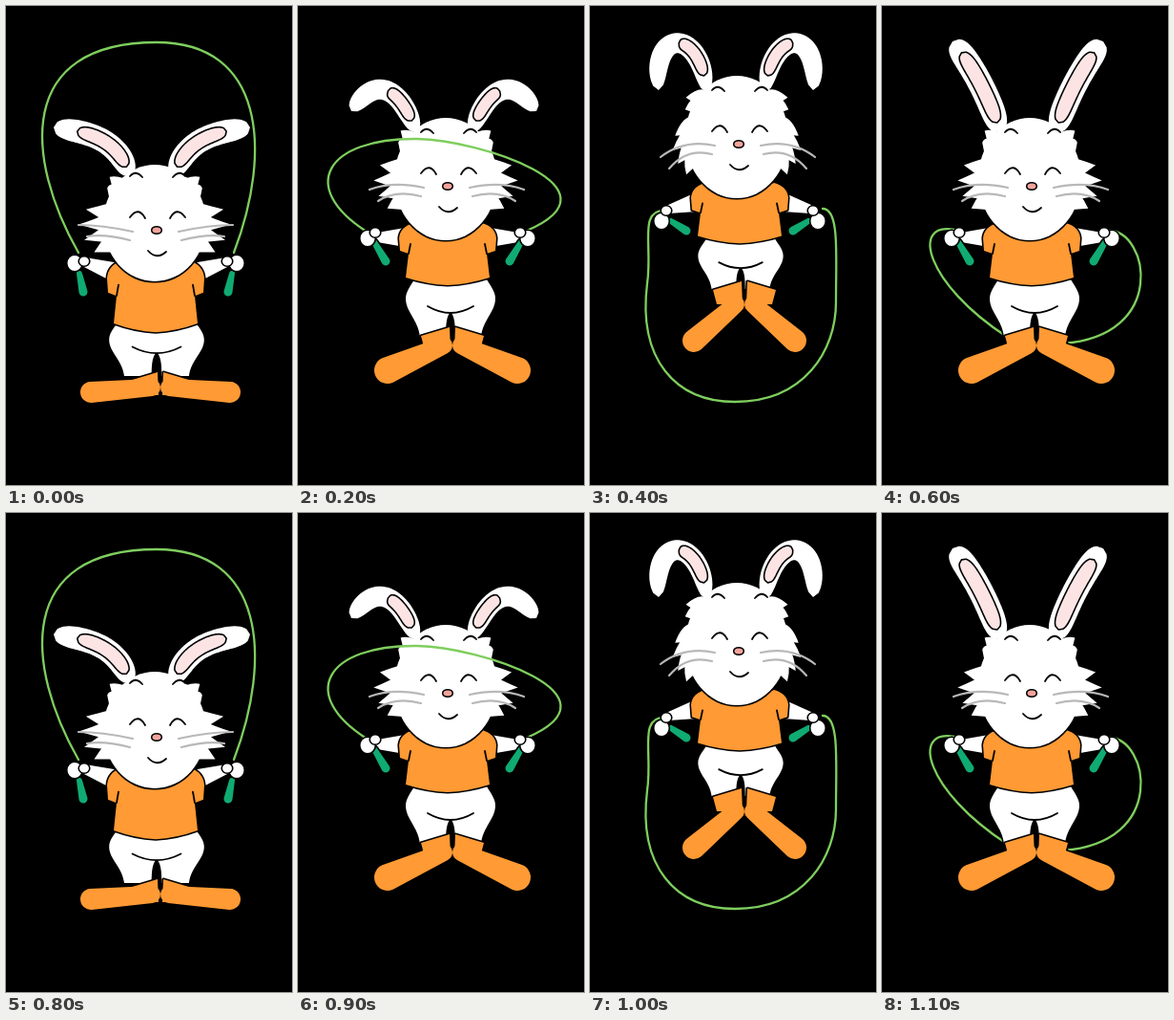
Recreate the animation shown at these times as an HTML page with a canvas. Size 300 by 501 pixels, loop 1.2 s.

```html
<!DOCTYPE html>
<html lang="en">
<head>
<meta charset="utf-8">
<title>Skipping rabbit</title>
<style>
html, body { margin: 0; width: 100%; height: 100%; overflow: hidden; background: #000; }
canvas { display: block; width: 100vw; height: 100vh; }
</style>
</head>
<body>
<canvas id="stage" width="300" height="501"></canvas>
<script>
const ctx = document.getElementById('stage').getContext('2d');

const WHITE = '#fff', BLACK = '#000', ORANGE = '#ff9a34', PINK = '#fde4e4';
const GREEN = '#10ab72', ROPE = '#7fce5e', GREY = '#b8b8b8', NOSE = '#f3a49b';
const BODY_X = 157, EAR_X = 153, BOOT_X = 162;

function ink(path, color = BLACK, width = 1.8) {
  ctx.strokeStyle = color;
  ctx.lineWidth = width;
  ctx.stroke(path);
}

// Several paths become one silhouette with a dark rim.
function paint(color, ...paths) {
  paths.forEach(p => ink(p, BLACK, 3.2));
  ctx.fillStyle = color;
  paths.forEach(p => ctx.fill(p));
}

// Places a half drawing on both sides of the vertical line at x.
function pair(half, x, y = 0, sx = 1, sy = 1) {
  const path = new Path2D();
  for (const side of [-1, 1]) {
    path.addPath(half, new DOMMatrix([side * sx, 0, 0, sy, x, y]));
  }
  return path;
}

function oval(x, y, rx, ry) {
  const path = new Path2D();
  path.ellipse(x, y, rx, ry, 0, 0, Math.PI * 2);
  return path;
}

// Rounded bar whose radius goes from r1 to r2.
function taper([x1, y1], r1, [x2, y2], r2) {
  const path = new Path2D(), a = Math.atan2(y2 - y1, x2 - x1), q = Math.PI / 2;
  path.arc(x1, y1, r1, a + q, a + 3 * q);
  path.arc(x2, y2, r2, a - q, a + q);
  path.closePath();
  return path;
}

// Band along part of a cubic spine, rounded at both ends.
function band(spine, from, to, width) {
  const left = [], right = [], steps = 40;
  for (let i = 0; i <= steps; i++) {
    const u = i / steps, t = from + (to - from) * u, s = 1 - t;
    const [x, y, dx, dy] = [0, 1].map(k => {
      const [a, b, c, d] = spine.map(p => p[k]);
      return s * s * s * a + 3 * s * s * t * b + 3 * s * t * t * c + t * t * t * d;
    }).concat([0, 1].map(k => {
      const [a, b, c, d] = spine.map(p => p[k]);
      return s * s * (b - a) + 2 * s * t * (c - b) + t * t * (d - c);
    }));
    const h = width * Math.sqrt(1 - (2 * u - 1) ** 6) / Math.hypot(dx, dy);
    left.push([x - dy * h, y + dx * h]);
    right.unshift([x + dy * h, y - dx * h]);
  }
  const path = new Path2D();
  left.concat(right).forEach(p => path.lineTo(...p));
  path.closePath();
  return path;
}

// One pointed lock of fur on the right half of a head with radii rx, ry.
function lock(rx, ry, deg, reach, tilt) {
  const at = (d, k = 1) => {
    const a = d * Math.PI / 180;
    return [rx * k * Math.cos(a), ry * k * Math.sin(a)];
  };
  const path = new Path2D();
  path.moveTo(...at(deg - 10, 0.97));
  path.quadraticCurveTo(...at(deg - 5, 1.12), ...at(deg + tilt, 1 + reach));
  path.lineTo(...at(deg + 8, 0.97));
  path.closePath();
  return path;
}

function fur({ x, y, ry, fluff, tilt }) {
  const locks = [lock(54, ry, -42, 0.18, tilt), lock(54, ry, -33, 0.1, tilt)];
  for (let deg = -10; deg <= 24; deg += 11) {
    locks.push(lock(54, ry, deg, fluff * (1 - Math.abs(deg - 3) / 45), tilt));
  }
  return [oval(x, y, 54, ry), ...locks.map(l => pair(l, x, y))];
}

const HALF_SHIRT = new Path2D('M0 10L36 -4Q50 0 51 12L50 25L41 28L44 53Q22 60 0 61Z');
const SLEEVE = new Path2D('M41 28L39 18');
const HALF_HIPS = new Path2D('M0 0H37C41 8 47 14 47 22C47 36 34 44 32 62H5C5 48 4 40 0 36Z');
const CROTCH = new Path2D('M0 37Q12 37 24 30');
const ANKLE = new Path2D('M3 0L33 9L29 24H2Z');

function face(dx, dy) {
  ctx.save();
  ctx.translate(dx, dy);
  ink(pair(new Path2D('M13 176Q20 163 29 175M16 133Q23 125 29 132'), 158));
  ink(new Path2D('M148 210Q157 220 167 211'));
  paint(NOSE, oval(157, 188.5, 4.5, 3));
  ctx.restore();
}

function whiskers(x, y, droop) {
  const half = new Path2D();
  [[24, 81], [27, 72]].forEach(([near, far], i) => {
    const top = y + 9 * i;
    half.moveTo(near, top);
    half.quadraticCurveTo((near + far) / 2 + 4, top - 7, far, top + droop + 3 * i);
  });
  ink(pair(half, x), GREY, 2.2);
}

// Sides are measured outwards from the middle of each part.
const mid = {
  head: { x: 155, y: 181, ry: 64, fluff: 0.42, tilt: 0, droop: 2 },
  shirt: [231, 1], hips: [160, 284, 1, 1],
  boot: 336, heel: [9, 19], toe: [68, 45], toeSize: 14,
  arm: [[45, 242], [74, 242]], fist: [84, 243], thumb: [76, 237],
  grip: [[77, 247], [65, 267]]
};

const low = {
  head: { x: 156, y: 227, ry: 61, fluff: 0.5, tilt: 0, droop: -7 },
  ear: [[23, 178], [35, 140], [63, 132], [103, 127]], earSize: 12, pinkEnd: 0.77,
  shirt: [271, 1.15], hips: [158, 328, 1.06, 0.95],
  boot: 383, heel: [9, 16], toe: [73, 21], toeSize: 11,
  arm: [[44, 278], [74, 268]], fist: [85, 269], thumb: [75, 267],
  grip: [[80, 280], [76, 299]],
  rope: 'M76 258C20 160 10 38 158 38C270 38 280 150 239 258'
};

const rise = {
  ...mid,
  ear: [[29, 132], [45, 86], [71, 70], [97, 110]], earSize: 10.5, pinkEnd: 0.48,
  rope: 'M72 236C0 190 28 138 125 139C190 140 345 190 240 235'
};

const high = {
  head: { x: 154, y: 137, ry: 64, fluff: 0.28, tilt: 9, droop: 12 },
  ear: [[31, 90], [35, 24], [89, 20], [81, 88]], earSize: 10.5, pinkEnd: 0.48,
  shirt: [189, 0.97], hips: [158, 242, 0.95, 0.87],
  boot: 288, heel: [9, 24], toe: [53, 62], toeSize: 12,
  arm: [[44, 205], [72, 212]], fist: [82, 225], thumb: [77, 214],
  grip: [[72, 225], [56, 235]],
  rope: 'M80 214C50 212 66 250 60 290C50 370 90 414 152 414C225 414 258 360 258 310S262 212 244 212'
};

const fall = {
  ...mid,
  ear: [[29, 132], [40, 96], [58, 62], [79, 37]], earSize: 13, pinkEnd: 0.84,
  rope: 'M76 234C30 225 45 290 131 346M238 235C280 235 300 345 190 353'
};

const poses = [low, rise, high, fall];

function draw(p) {
  const { x, y, droop } = p.head;
  const [hipX, ...hipFit] = p.hips;
  const [shirtY, stretch] = p.shirt;
  const rope = () => ink(new Path2D(p.rope), ROPE, 2.3);
  const sides = half => pair(half, BODY_X);

  ctx.fillStyle = BLACK;
  ctx.fillRect(0, 0, 300, 501);
  ctx.lineCap = ctx.lineJoin = 'round';

  if (p === fall) rope();
  paint(WHITE, sides(taper(p.arm[0], 10, p.arm[1], 5)));
  paint(WHITE, pair(HALF_HIPS, hipX, ...hipFit));
  ink(pair(CROTCH, hipX, ...hipFit));
  const foot = taper(p.heel, 9, p.toe, p.toeSize);
  paint(ORANGE, pair(ANKLE, BOOT_X, p.boot), pair(foot, BOOT_X, p.boot));
  paint(ORANGE, pair(HALF_SHIRT, BODY_X, shirtY, 1, stretch));
  ink(pair(SLEEVE, BODY_X, shirtY, 1, stretch));

  paint(WHITE, ...fur(p.head), pair(band(p.ear, 0, 1, p.earSize), EAR_X));
  paint(PINK, pair(band(p.ear, 0.1, p.pinkEnd, p.earSize * 0.55), EAR_X));
  whiskers(x + 1, y + 9, droop);
  face(x - 155, y - 181);

  if (p !== fall) rope();
  paint(GREEN, sides(taper(p.grip[0], 3, p.grip[1], 4.5)));
  paint(WHITE, sides(oval(...p.fist, 7.5, 8)));
  paint(WHITE, sides(oval(...p.thumb, 5, 4.5)));
}

// One slow skip followed by one at double speed.
function poseAt(ms) {
  const t = ms % 1200;
  return t < 800 ? Math.floor(t / 200) : Math.floor((t - 800) / 100);
}

const start = performance.now();
let shown = -1;
function tick() {
  const next = poseAt(performance.now() - start);
  if (next !== shown) draw(poses[shown = next]);
  requestAnimationFrame(tick);
}
tick();
</script>
</body>
</html>
```
